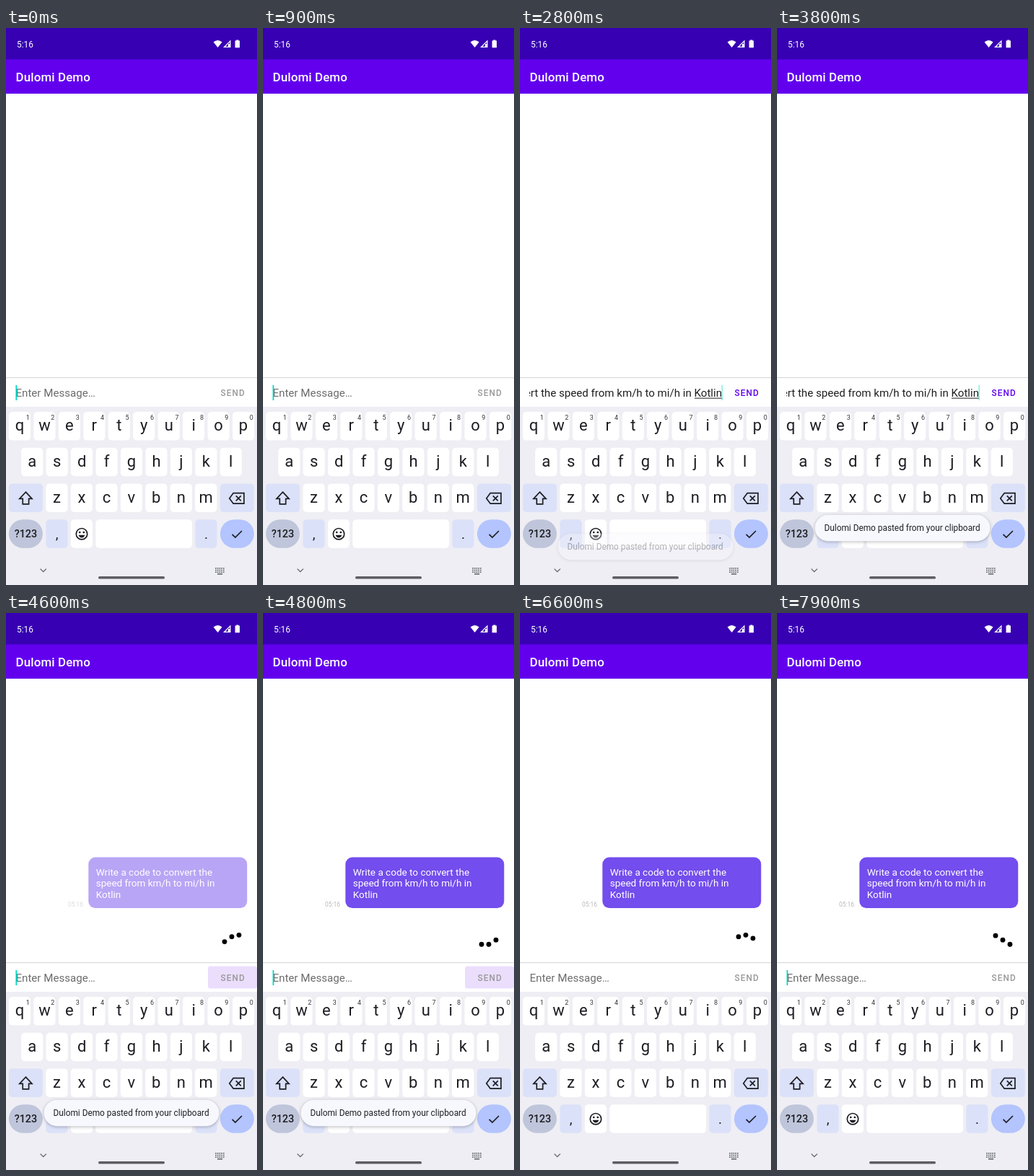
An HTML page for the animation above (8000 ms loop, 348 by 772 pixels).

```html
<!DOCTYPE html>
<html lang="en">
<head>
<meta charset="utf-8">
<title>Chat demo</title>
<style>
html, body { margin: 0; width: 100%; height: 100%; overflow: hidden; background: #fff; }
svg { display: block; width: 100%; height: 100%; font-family: Roboto, sans-serif; }
text { white-space: pre; }
.mid { text-anchor: middle; }
.medium { font-weight: 500; }
.line { fill: none; stroke: #1c1d22; stroke-width: 1.7; }
.letter { font-size: 22px; fill: #1c1d22; }
.hint { font-size: 9px; fill: #33343a; }
.input { font-size: 15.1px; }
.small { font-size: 11.85px; }
.float { filter: drop-shadow(0 1px 2px rgba(0, 0, 0, .28)); }
</style>
</head>
<body>
<svg viewBox="0 0 348 772" preserveAspectRatio="none">
  <defs><clipPath id="field"><rect x="13" y="486" width="267.8" height="36"/></clipPath></defs>
  <rect width="348" height="772" fill="#fff"/>

  <!-- status and app bars -->
  <rect width="348" height="44" fill="#3700b3"/>
  <rect y="43.5" width="348" height="47.5" fill="#6200ee"/>
  <g fill="#fff">
    <text x="15" y="27" font-size="11.85">5:16</text>
    <path d="M287.6 19.6Q293.6 14.6 299.6 19.6L293.6 27Z"/>
    <path d="M311.5 16.5V27H301ZM310.2 19.6L304.2 25.7H308V22H310.2Z" fill-rule="evenodd"/>
    <path d="M319.3 16.4H322.3V17.6H324V27.2H317.6V17.6H319.3Z"/>
    <text x="13.5" y="74" font-size="16.9" letter-spacing=".13" class="medium">Dulomi Demo</text>
  </g>

  <!-- conversation -->
  <g id="bubble">
    <rect x="114.3" y="338.6" width="220" height="70.4" rx="9.5" fill="#734ded"/>
    <g fill="#fff" font-size="13.54">
      <text x="124.7" y="363.6">Write a code to convert the</text>
      <text x="124.7" y="379.4">speed from km/h to mi/h in</text>
      <text x="124.7" y="395.3">Kotlin</text>
    </g>
    <text x="86" y="407" font-size="8.46" fill="#b9b9b9">05:16</text>
  </g>
  <g id="dots">
    <circle cx="303" r="3.4"/><circle cx="313" r="3.4"/><circle cx="323" r="3.4"/>
  </g>

  <!-- message field -->
  <rect y="484" width="348" height="1.2" fill="#d9d9d9"/>
  <text id="hint" class="input" x="13.5" y="511" fill="#6c6c6c">Enter Message…</text>
  <g id="typed" clip-path="url(#field)">
    <text class="input" x="280" y="511" text-anchor="end" fill="#1f1f1f">Write a code to convert the speed from km/h to mi/h in <tspan id="word">Kotlin</tspan></text>
    <rect x="242" y="512.6" width="38" height="1" fill="#1f1f1f"/>
  </g>
  <rect id="ripple" x="280" y="489.5" width="68" height="31" rx="3.4" fill="#6200ee"/>
  <text id="send" class="medium small" x="297.6" y="509.7" letter-spacing="1.06">SEND</text>

  <g id="keyboard"></g>

  <rect id="caret" y="495" height="21" fill="#03dac5"/>
  <g id="paste">
    <path d="M14 515.6L19.7 521.3A8.1 8.1 0 1 1 8.3 521.3Z" fill="#03dac5"/>
    <rect class="float" x="13" y="448" width="92.5" height="40.4" rx="20.2" fill="#fff"/>
    <text class="small" x="27.7" y="472.6">Paste</text>
    <circle cx="86.7" cy="462.8" r="1.9"/><circle cx="86.7" cy="468.2" r="1.9"/><circle cx="86.7" cy="473.6" r="1.9"/>
  </g>
  <g id="toast">
    <rect class="float" x="52.5" y="674.8" width="243" height="36.4" rx="18.2" fill="#f7f8fd"/>
    <text class="small mid" x="173.6" y="697" fill="#1f2024">Dulomi Demo pasted from your clipboard</text>
  </g>
</svg>
<script>
const LOOP = 8000, STEP = 100;
const PITCH = 34.45, KEY_W = 30.2, KEY_H = 39.6;
const WHITE = '#fff', TINT = '#dbe1f8';
const $ = id => document.getElementById(id);

const key = (x, y, w = KEY_W, fill = WHITE, r = 5) =>
  `<rect x="${x}" y="${y}" width="${w}" height="${KEY_H}" rx="${r}" fill="${fill}"/>`;

const letterRow = (letters, x0, y, hints = '') => [...letters].map((c, i) => {
  const x = x0 + i * PITCH;
  return key(x, y) +
    `<text class="letter mid" x="${x + KEY_W / 2}" y="${y + 26.2}">${c}</text>` +
    (hints ? `<text class="hint mid" x="${x + 26.4}" y="${y + 10.6}">${hints[i]}</text>` : '');
}).join('');

// small grid glyph in the navigation strip
function gridIcon() {
  let s = '';
  for (let row = 0; row < 3; row++)
    for (let col = 0; col < 5; col++)
      s += `<rect x="${290.2 + col * 2.7}" y="${748 + row * 2.7}" width="1.6" height="1.6"/>`;
  return s + '<rect x="293" y="756" width="7.2" height="1.5"/>';
}

$('keyboard').innerHTML = `
  <rect y="525" width="348" height="247" fill="#eeeef4"/>
  ${letterRow('qwertyuiop', 3.9, 532, '1234567890')}
  ${letterRow('asdfghjkl', 21.1, 581.7)}
  ${key(3.9, 631.4, 47, TINT)}
  ${letterRow('zxcvbnm', 55.4, 631.4)}
  ${key(296.9, 631.4, 47, TINT)}
  ${key(3.9, 681.2, 47, '#bfc5da', 19.8)}
  ${key(55.4, 681.2, KEY_W, TINT)}
  ${key(89.9, 681.2)}
  ${key(124.3, 681.2, 133.7)}
  ${key(262.3, 681.2, KEY_W, TINT)}
  ${key(296.9, 681.2, 47, '#b3c4fe', 19.8)}
  <path class="line" d="M27.4 643.2L36 652.3H31.6V659.8H23.2V652.3H18.8Z"/>
  <path class="line" d="M315.2 644.6H330V659.2H315.2L309.8 651.9ZM318.8 648.4L325.8 655.4M325.8 648.4L318.8 655.4"/>
  <text class="medium mid" x="27.4" y="706.2" font-size="14.4" fill="#1c1d22">?123</text>
  <text class="letter mid" x="70.5" y="708" style="font-size:19px">,</text>
  <text class="letter mid" x="277.4" y="708" style="font-size:19px">.</text>
  <circle class="line" cx="105" cy="701.2" r="7.7"/>
  <circle cx="102.2" cy="699" r="1.3"/><circle cx="107.8" cy="699" r="1.3"/>
  <path d="M100.6 702.8H109.4Q108.2 706.4 105 706.4T100.6 702.8Z" fill="#1c1d22"/>
  <path class="line" d="M313.6 701.8L317.9 706.1L327 697"/>
  <path class="line" d="M47.6 749.6L51.7 753.6L55.8 749.6" style="stroke:#5c5e66;stroke-width:1.3"/>
  <g fill="#5c5e66">${gridIcon()}</g>
  <rect x="128" y="760" width="92" height="3.6" rx="1.8" fill="#5d5d62"/>`;

// piecewise linear value from [time, value] pairs
function track(points, t) {
  if (t <= points[0][0]) return points[0][1];
  for (let i = 1; i < points.length; i++) {
    const [t0, a] = points[i - 1], [t1, b] = points[i];
    if (t < t1) return a + (b - a) * (t - t0) / (t1 - t0);
  }
  return points[points.length - 1][1];
}

const PASTED = 2700, SENT = 4600;
const caretFlips = [400, 900, 1400, 1900, 2400, PASTED, 3300, 3800, 4300, SENT,
  5200, 5700, 6200, 6700, 7200, 7700];
const fades = {
  paste: [[1400, 0], [1600, 1], [2600, 1], [2700, 0]],
  toast: [[2700, 0], [3000, 1], [5100, 1], [5400, 0]],
  bubble: [[4500, 0], [4700, 1]],
  ripple: [[4400, 0], [4600, .13], [4800, .13], [5200, 0]]
};
const toastDrop = [[2700, 44], [2800, 26], [2900, 11], [3000, 3], [3100, 0]];
const wave = [[4800, -30], [5400, 270], [6600, 890], [7900, 1530], [8000, 1580]];

const show = (id, on) => $(id).setAttribute('visibility', on ? 'visible' : 'hidden');

function draw(t) {
  const typed = t >= PASTED && t < SENT;
  show('typed', typed);
  show('hint', !typed);
  $('send').setAttribute('fill', typed ? '#6200ee' : '#999');

  for (const id in fades) $(id).setAttribute('opacity', track(fades[id], t));
  $('toast').setAttribute('transform', `translate(0 ${track(toastDrop, t)})`);

  show('caret', caretFlips.filter(f => f <= t).length % 2 === 0);
  $('caret').setAttribute('x', typed ? 279.6 : 13.4);
  $('caret').setAttribute('width', typed ? 1.2 : 1.8);
  $('caret').setAttribute('opacity', typed ? .6 : 1);

  show('dots', t >= SENT);
  const phase = t < 4800 ? -30 - (4800 - t) / 2 : track(wave, t);
  [...$('dots').children].forEach((dot, i) => {
    const angle = (phase + 60 - 60 * i) * Math.PI / 180;
    dot.setAttribute('cy', 453.2 + 7 * Math.cos(angle));
  });
}

const start = performance.now();
function tick() {
  const t = (performance.now() - start) % LOOP;
  draw(Math.floor(t / STEP) * STEP);
  requestAnimationFrame(tick);
}
tick();
</script>
</body>
</html>
```
